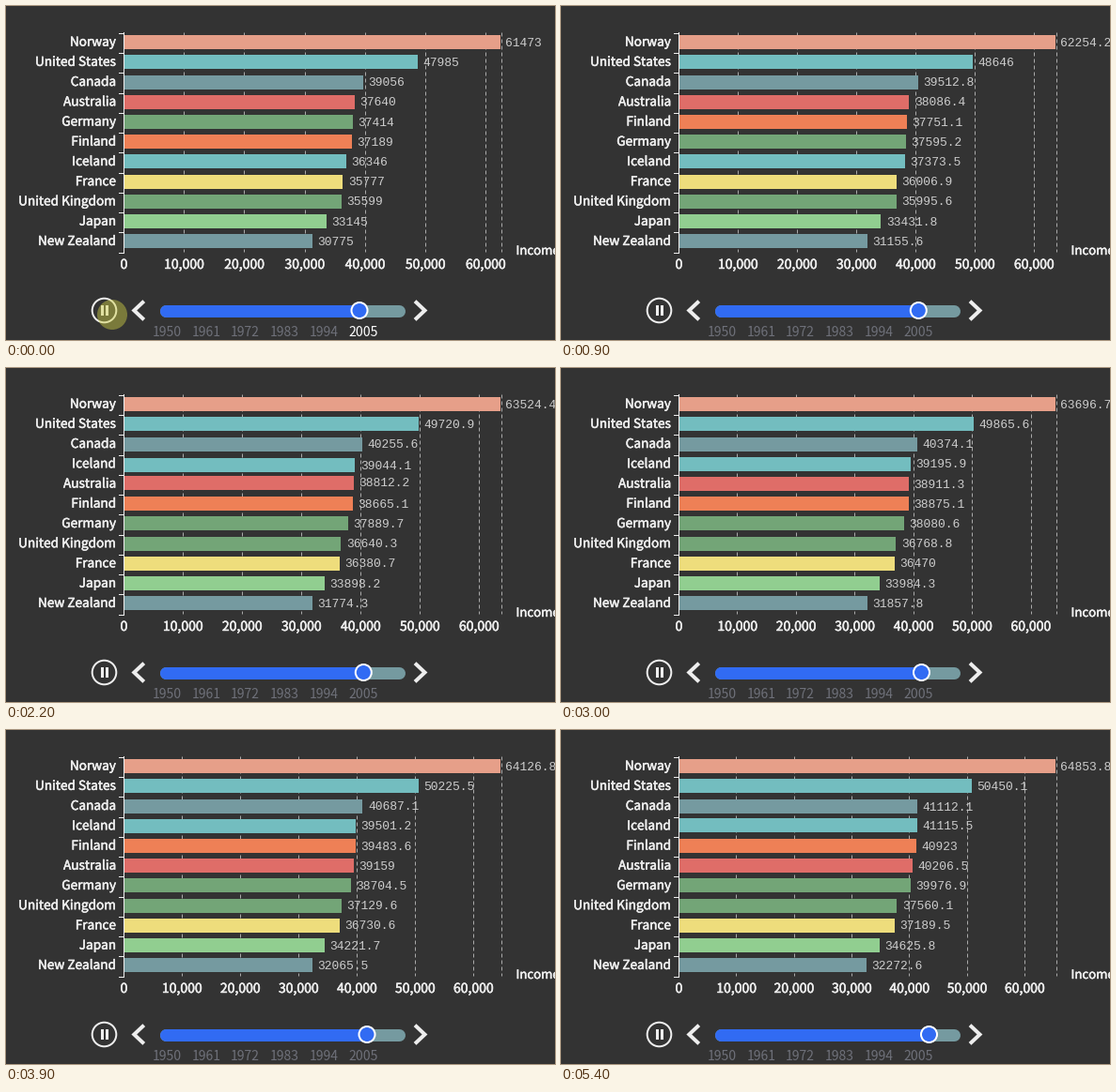
Animation, 584 px wide and 356 px high, one loop 5500 ms. Source, as a matplotlib script:

```python
import numpy as np
import matplotlib.pyplot as plt
from matplotlib.animation import FuncAnimation
from matplotlib.patches import Circle, Rectangle
from matplotlib.patheffects import withStroke

W, H, DPI = 584, 356, 100
FRAMES, STEP = 55, 100
PX = 72 / DPI
LEFT, WIDTH, TOP, BOTTOM = 125, 401, 28, 261.5
SWAP = 340   # duration of a rank change, ms
YEAR = 2093  # time a label needs to count to the next year's value, ms
SWITCHES = [0, 2741, 4100]

SANS, MONO = "Noto Sans CJK JP", "Liberation Mono"
BACK, LIGHT, MUTED, BLUE = "#333333", "#eeeeee", "#6e7079", "#316bf3"
SLATE, TEAL, GREEN = "#759aa0", "#73bdbf", "#73a577"

# Colour, first value and the value each switch counts towards
INCOME = {
    "Norway": ("#e69f89", 61473, 63573, 64573, 64853.8),
    "United States": (TEAL, 47985, 49762, 50599, 50450.1),
    "Canada": (SLATE, 39056, 40284, 41012, 41112.1),
    "Australia": ("#df6d68", 37640, 38840, 39416, 40206.5),
    "Germany": (GREEN, 37414, 37901, 39352, 39976.9),
    "Finland": ("#ee8056", 37189, 38700, 40115, 40923),
    "Iceland": (TEAL, 36346, 39108, 39818, 41115.5),
    "France": ("#eedd7c", 35777, 36395, 37001, 37189.5),
    "United Kingdom": (GREEN, 35599, 36665, 37504, 37560.1),
    "Japan": ("#91ce90", 33145, 33916, 34468, 34625.8),
    "New Zealand": (SLATE, 30775, 31798, 32281, 32272.6),
}
NAMES = list(INCOME)
N = len(NAMES)
PITCH = (BOTTOM - TOP) / N
START, *TARGETS = np.array([row[1:] for row in INCOME.values()]).T


def incomes(t):
    """Each switch counts on from wherever the labels are."""
    shares = [
        np.interp(t, [0, 900, 1500, 2251], [0, 0.372, 0.6594, 1]),
        np.clip((min(t, SWITCHES[2]) - SWITCHES[1]) / YEAR, 0, 1),
        np.clip((t - SWITCHES[2]) / 1300, 0, 1),
    ]
    value = START
    for target, share in zip(TARGETS, shares):
        value = value + (target - value) * share
    return value


def ranks(t):
    return np.argsort(np.argsort(-incomes(max(t, 0)), kind="stable"))


def stepped(t, levels, duration):
    """Glide from one level to the next at every switch."""
    moves = np.diff(levels) * np.clip((t - np.array(SWITCHES)) / duration, 0, 1)
    return levels[0] + moves.sum()


def shown(value):
    return f"{value:.1f}".removesuffix(".0")


fig = plt.figure(figsize=(W / DPI, H / DPI), dpi=DPI, facecolor=BACK)
ax = fig.add_axes([0, 0, 1, 1])
ax.set(xlim=(0, W), ylim=(H, 0))
ax.axis("off")


def line(xs, ys, color=LIGHT, width=1, **kw):
    return ax.plot(xs, ys, color=color, lw=width * PX, **kw)[0]


def text(x, y, s, color=LIGHT, family=SANS, size=14, **kw):
    return ax.text(x, y, s, color=color, family=family, fontsize=size * PX, va="baseline", **kw)


def label(x, y, s, size=13.6, **kw):
    """Text of medium weight."""
    heavier = [withStroke(linewidth=0.5 * PX, foreground=LIGHT)]
    return text(x, y, s, size=size, path_effects=heavier, **kw)


def disc(x, y, r, **kw):
    return ax.add_patch(Circle((x, y), r, **kw))


# Chart
grid = [line([0, 0], [TOP, BOTTOM], "#aaaaaa", dashes=(4, 3), zorder=1) for _ in range(7)]
grid_text = [label(0, 280, f"{10000 * k:,}", 14, ha="center") for k in range(7)]
bars, values, row_text = [], [], []
for i, (color, *_) in enumerate(INCOME.values()):
    bars.append(ax.add_patch(Rectangle((LEFT, 0), 1, 15, fc=color, lw=0, zorder=2 + 0.01 * (N - i))))
    values.append(text(0, 0, "", "#cccccc", MONO, 13, zorder=4))
    row_text.append(label(117, TOP + (i + 0.5) * PITCH + 4, "", ha="right"))
line([LEFT, LEFT], [TOP, BOTTOM + 0.5], zorder=3)
for k in range(N + 1):
    y = round(TOP + k * PITCH) + 1
    line([LEFT - 5, LEFT], [y, y], zorder=3)
label(542.5, 265, "Income", 13.2)

# Timeline
MID, TRACK = 324.5, 169.7
line([TRACK, 418], [MID, MID], SLATE, 13, solid_capstyle="round")
progress = line([TRACK, TRACK], [MID, MID], BLUE, 13, solid_capstyle="round")
handle = disc(0, MID, 8.5, fc=BLUE, ec="white", lw=2 * PX, zorder=5)
for x, d in ((136.3, 1), (445.5, -1)):
    line([x + 9 * d, x, x + 9 * d], [MID - 8.5, MID, MID + 8.5], LIGHT, 4, solid_joinstyle="miter")
disc(104.5, MID, 12.8, fc="none", ec=LIGHT, lw=2 * PX, zorder=4)
for x in (100.5, 105.5):
    ax.add_patch(Rectangle((x, MID - 5.5), 3, 11, fc=LIGHT, lw=0, zorder=4))
spot = disc(113, 329, 16, fc="#d2d246", alpha=0.45, lw=0, zorder=6)
years = [text(171 + 41.8 * k, 352, str(1950 + 11 * k), MUTED, ha="center") for k in range(6)]


def draw(i):
    t = i * STEP
    now, row = incomes(t), ranks(t - STEP)
    place = np.mean([ranks(s) for s in np.linspace(t - SWAP, t, 35)], axis=0)
    for k, name in enumerate(NAMES):
        y = TOP + (place[k] + 0.5) * PITCH
        length = WIDTH * now[k] / now[0]
        bars[k].set_y(y - 7.5)
        bars[k].set_width(length)
        values[k].set_position((LEFT + length + 5.5, y + 4))
        values[k].set_text(shown(now[k]))
        row_text[row[k]].set_text(name)

    top = stepped(t, [62490, 63650, 64672, 65373], 450)
    for k in range(7):
        x = LEFT + WIDTH * 10000 * k / top
        grid_text[k].set_x(x + 0.5)
        grid[k].set_xdata([x, x])
    grid[0].set_xdata([LEFT + WIDTH + 0.5] * 2)

    x = stepped(t, [376, 380.3, 384, 391.5], 300)
    progress.set_xdata([TRACK, x])
    handle.center = (x, MID)
    spot.set_visible(t < 200)
    years[5].set_color("white" if t < 300 else MUTED)
    return []


anim = FuncAnimation(fig, draw, frames=FRAMES, interval=STEP, repeat=True, repeat_delay=0)
plt.show()
```
